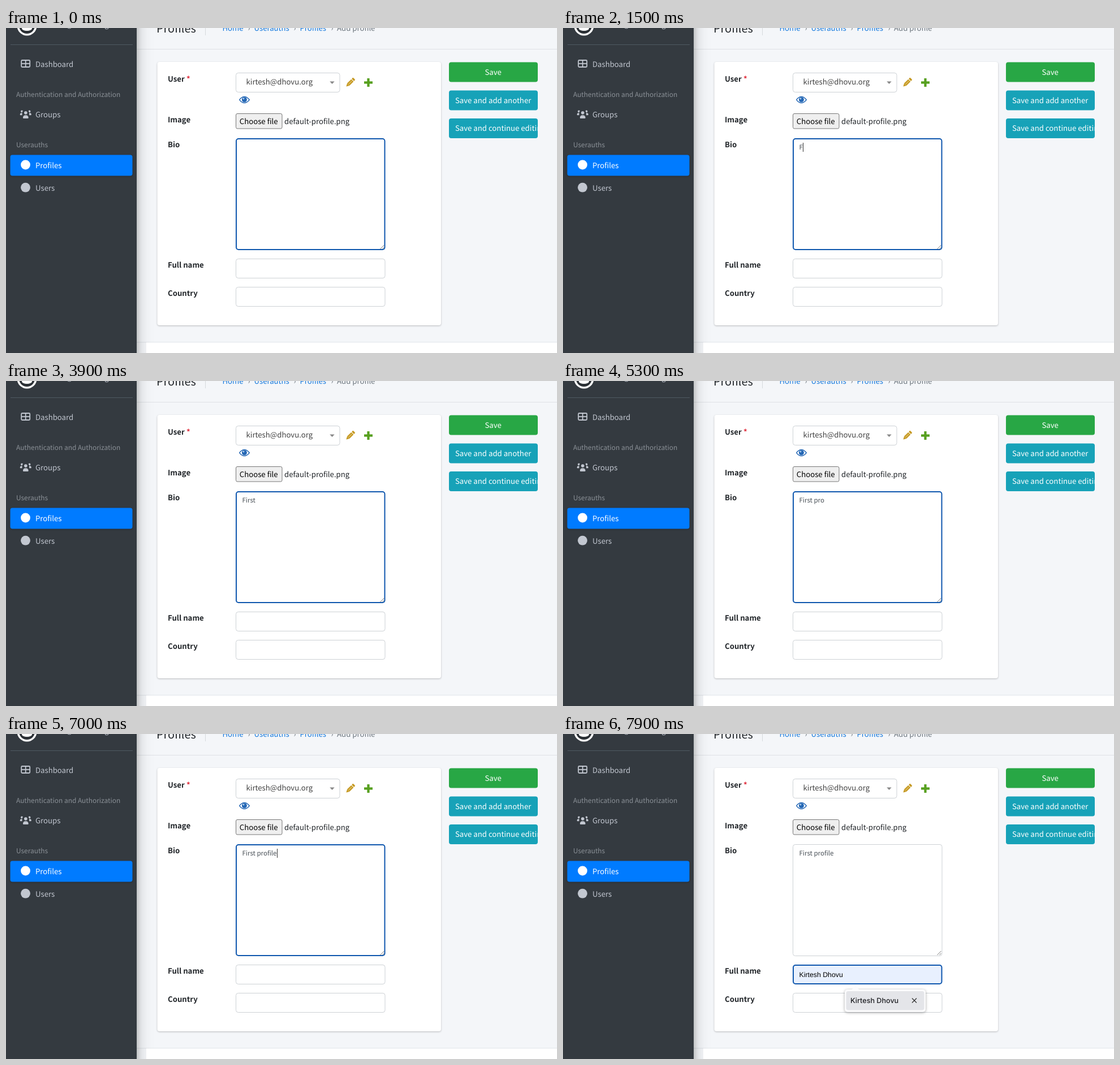
An HTML page with a canvas for the animation above (8 s loop, 974 by 575 pixels).

```html
<!DOCTYPE html>
<html lang="en">
<head>
<meta charset="utf-8">
<title>Add profile</title>
<style>
  html, body { margin: 0; width: 100%; height: 100%; overflow: hidden; background: #f4f6f9; }
  canvas { display: block; }
</style>
</head>
<body>
<canvas id="stage" width="974" height="575"></canvas>
<script>
const ctx = document.getElementById('stage').getContext('2d');
const SANS = '"Noto Sans CJK JP", "Noto Sans CJK SC", "Noto Sans", sans-serif';
const ARIAL = '"Liberation Sans", Arial, sans-serif';
const UI = 'Inter, sans-serif';
const LOOP = 8000, BLINK = 500;
const NAME = 'Kirtesh Dhovu', EMAIL = 'kirtesh@dhovu.org', BIO = 'First profile';
const FOCUS = '#0f57ae', BORDER = '#cdd1d5', INK = '#212529', MUTED = '#c2c7d0';

// Moment at which each character of the bio is typed
const KEYS = [1500, 2200, 2900, 3000, 3200, 3400, 4400, 4600, 4800, 5500, 5700, 5800, 6000];
const NAME_FOCUS = 7400, NAME_FILL = 7900;

function text(str, x, y, color = INK, size = 13.2, weight = 400, family = SANS) {
  ctx.font = `${weight} ${size}px ${family}`;
  ctx.fillStyle = color;
  ctx.fillText(str, x, y);
}

function rect(x, y, w, h, color) {
  ctx.fillStyle = color;
  ctx.fillRect(x, y, w, h);
}

function box(x, y, w, h, r, fill, stroke, line = 1) {
  ctx.beginPath();
  ctx.roundRect(x, y, w, h, r);
  ctx.fillStyle = fill;
  ctx.fill();
  if (!stroke) return;
  ctx.strokeStyle = stroke;
  ctx.lineWidth = line;
  ctx.stroke();
}

function disc(x, y, rx, color, ry = rx) {
  ctx.beginPath();
  ctx.ellipse(x, y, rx, ry, 0, 0, Math.PI * 2);
  ctx.fillStyle = color;
  ctx.fill();
}

function poly(points, color) {
  ctx.beginPath();
  points.forEach(([x, y]) => ctx.lineTo(x, y));
  ctx.closePath();
  ctx.fillStyle = color;
  ctx.fill();
}

function line(x1, y1, x2, y2, color, width = 1) {
  ctx.beginPath();
  ctx.moveTo(x1, y1);
  ctx.lineTo(x2, y2);
  ctx.strokeStyle = color;
  ctx.lineWidth = width;
  ctx.stroke();
}

function shadowed(dy, blur, alpha, draw) {
  ctx.save();
  ctx.shadowColor = `rgba(0,0,0,${alpha})`;
  ctx.shadowBlur = blur;
  ctx.shadowOffsetY = dy;
  draw();
  ctx.restore();
}

function field(x, y, w, h, focused, fill = '#fff') {
  if (focused) box(x + .5, y + .5, w - 1, h - 1, 4, fill, FOCUS, 2);
  else box(x, y, w, h, 4, fill, BORDER);
}

function drawPage() {
  rect(0, 0, 974, 575, '#f4f6f9');
  rect(231, 37, 743, 1, '#dee2e6');
  rect(231, 555.5, 743, 1, '#dee2e6');

  const blue = '#1277dc', grey = '#6c757d';
  text('Profiles', 266, 8, INK, 19.8);
  rect(352, 0, 1, 13, '#d5d9dd');
  text('Home', 382.5, 5, blue);
  text('Userauths', 438.5, 5, blue);
  text('Profiles', 519.5, 5, blue);
  text('Add profile', 585, 5, grey);
  for (const x of [427.5, 508.5, 574.5]) text('›', x, 5, grey);
}

function person(x, y, s, color) {
  disc(x, y, 2.7 * s, color);
  ctx.beginPath();
  ctx.roundRect(x - 4.6 * s, y + 4 * s, 9.2 * s, 5.6 * s, [4 * s, 4 * s, s, s]);
  ctx.fill();
}

function drawSidebar() {
  const bar = () => rect(-100, -100, 331, 800, '#343a40');
  shadowed(0, 26, .25, bar);
  shadowed(0, 9, .2, bar);
  box(248, 556.5, 740, 30, [0, 0, 0, 8], '#fff');

  disc(37, -4, 17.5, '#fff');
  disc(37, -4, 14, '#2b3035');
  disc(37, 1, 9, '#fff', 4);
  text(EMAIL, 64, -1, MUTED);
  rect(8, 29, 216, 1, '#4f5962');

  ctx.beginPath();
  ctx.roundRect(27.2, 57, 15, 12, 1.5);
  ctx.strokeStyle = MUTED;
  ctx.lineWidth = 1.8;
  ctx.stroke();
  line(34.7, 57, 34.7, 69, MUTED, 1.8);
  line(27, 63, 42, 63, MUTED, 1.8);
  text('Dashboard', 52, 68.8, MUTED);

  const heading = '#8b9197';
  text('Authentication and Authorization', 18, 121.5, heading, 11.9);
  person(28, 147.5, .7, MUTED);
  person(41.5, 147.5, .7, MUTED);
  box(28.5, 146.5, 12.5, 14, 4, '#343a40');
  person(34.8, 150, 1.05, MUTED);
  text('Groups', 52, 158.4, MUTED);

  text('Userauths', 18, 211, heading, 11.9);
  shadowed(1, 3, .25, () => box(7.5, 224.5, 216, 37, 4, '#007bff'));
  disc(34.5, 242, 8.4, '#fff');
  text('Profiles', 52, 247.8, '#fff');
  disc(34.5, 282.2, 8.4, MUTED);
  text('Users', 52, 287.8, MUTED);
}

function drawUserTools() {
  ctx.save();
  ctx.translate(608.5, 96.5);
  ctx.rotate(Math.PI / 4);
  const gold = '#c69a25';
  box(-2.9, -9.8, 5.8, 3.4, 1.2, gold);
  rect(-2.9, -5.4, 5.8, 10.2, gold);
  poly([[-2.9, 4.8], [2.9, 4.8], [0, 10]], gold);
  rect(-.6, -4, 1.2, 8, '#e3c877');
  ctx.restore();

  rect(633, 94.4, 15, 4.2, '#57a01f');
  rect(638.4, 89, 4.2, 15, '#57a01f');

  const eye = '#2467b5';
  ctx.beginPath();
  ctx.moveTo(412.5, 127);
  ctx.quadraticCurveTo(421.4, 116, 430.3, 127);
  ctx.quadraticCurveTo(421.4, 138, 412.5, 127);
  ctx.fillStyle = '#fff';
  ctx.fill();
  ctx.strokeStyle = eye;
  ctx.lineWidth = 1.4;
  ctx.stroke();
  disc(421.4, 126.7, 4.5, eye);
  disc(420, 125, 1.3, '#c4dbf3');
}

function drawForm() {
  shadowed(1, 3, .25, () => box(267.5, 60, 501.5, 466, 4, '#fff'));
  const labels = [['User', 95], ['Image', 167], ['Bio', 211.3], ['Full name', 424], ['Country', 474]];
  for (const [label, y] of labels) text(label, 286, y, INK, 13.2, 700);
  text('*', 319, 95, '#e0303f', 13.2, 700);

  field(406.5, 79.5, 183.5, 34, false);
  text(EMAIL, 424.5, 100.3, '#444');
  poly([[572.3, 94.5], [580.7, 94.5], [576.5, 99]], '#888');
  drawUserTools();

  box(406.5, 151.5, 81.5, 26.5, 2.5, '#efefef', '#767676');
  text('Choose file', 412.8, 169.5, '#000');
  text('default-profile.png', 492, 169.5);
}

function drawButtons() {
  box(783, 60.5, 157, 35, 4, '#28a745');
  text('Save', 846.4, 82.6, '#fff');
  const more = [['Save and add another', 110.5], ['Save and continue editing', 160]];
  for (const [label, y] of more) {
    box(783, y, 157, 35, 4, '#17a2b8');
    ctx.save();
    ctx.beginPath();
    ctx.rect(783, y, 156.5, 35);
    ctx.clip();
    text(label, 794, y + 22.2, '#fff');
    ctx.restore();
  }
}

function drawBio(t) {
  const focused = t < NAME_FOCUS;
  field(406.5, 195.5, 263.5, 197, focused);
  line(661.5, 391, 668.5, 384, '#777');
  line(665.5, 391, 668.5, 388, '#777');

  const count = KEYS.filter(key => key <= t).length;
  const typed = BIO.slice(0, count);
  text(typed, 417.5, 215.3, '#495057', 11.5);
  // The caret restarts its blink with every key
  const since = t - (count ? KEYS[count - 1] : 100);
  const visible = since >= 0 && Math.floor(since / BLINK) % 2 === 0;
  if (focused && visible) rect(Math.round(417.8 + ctx.measureText(typed).width), 203, 1, 16, '#333');
}

function drawSuggestion(hovered) {
  shadowed(1, 5, .35, () => box(498, 452, 143, 40, 5, '#fbfbfc'));
  poly([[510, 452.5], [517, 446], [524, 452.5]], '#fbfbfc');
  if (hovered) box(500.5, 455, 138, 33.5, 4, '#e4e5e9');
  text(NAME, 508, 476, '#1f2024', 12.6, 500, UI);
  line(617, 467.5, 625, 475.5, '#333', 1.3);
  line(625, 467.5, 617, 475.5, '#333', 1.3);
}

function drawNames(t) {
  const focused = t >= NAME_FOCUS, filled = t >= NAME_FILL;
  field(406.5, 408.5, 263.5, 34, focused, filled ? '#e8f0fe' : '#fff');
  field(406.5, 458.5, 263.5, 34, false);
  if (filled) text(NAME, 417.5, 430.2, '#000', 12.3, 400, ARIAL);
  else if (focused) rect(418, 417, 1, 16, '#333');
  if (focused) drawSuggestion(filled);
}

function frame() {
  const t = performance.now() % LOOP;
  ctx.textRendering = 'geometricPrecision';
  drawPage();
  drawSidebar();
  drawForm();
  drawButtons();
  drawBio(t);
  drawNames(t);
  requestAnimationFrame(frame);
}
frame();
</script>
</body>
</html>
```
